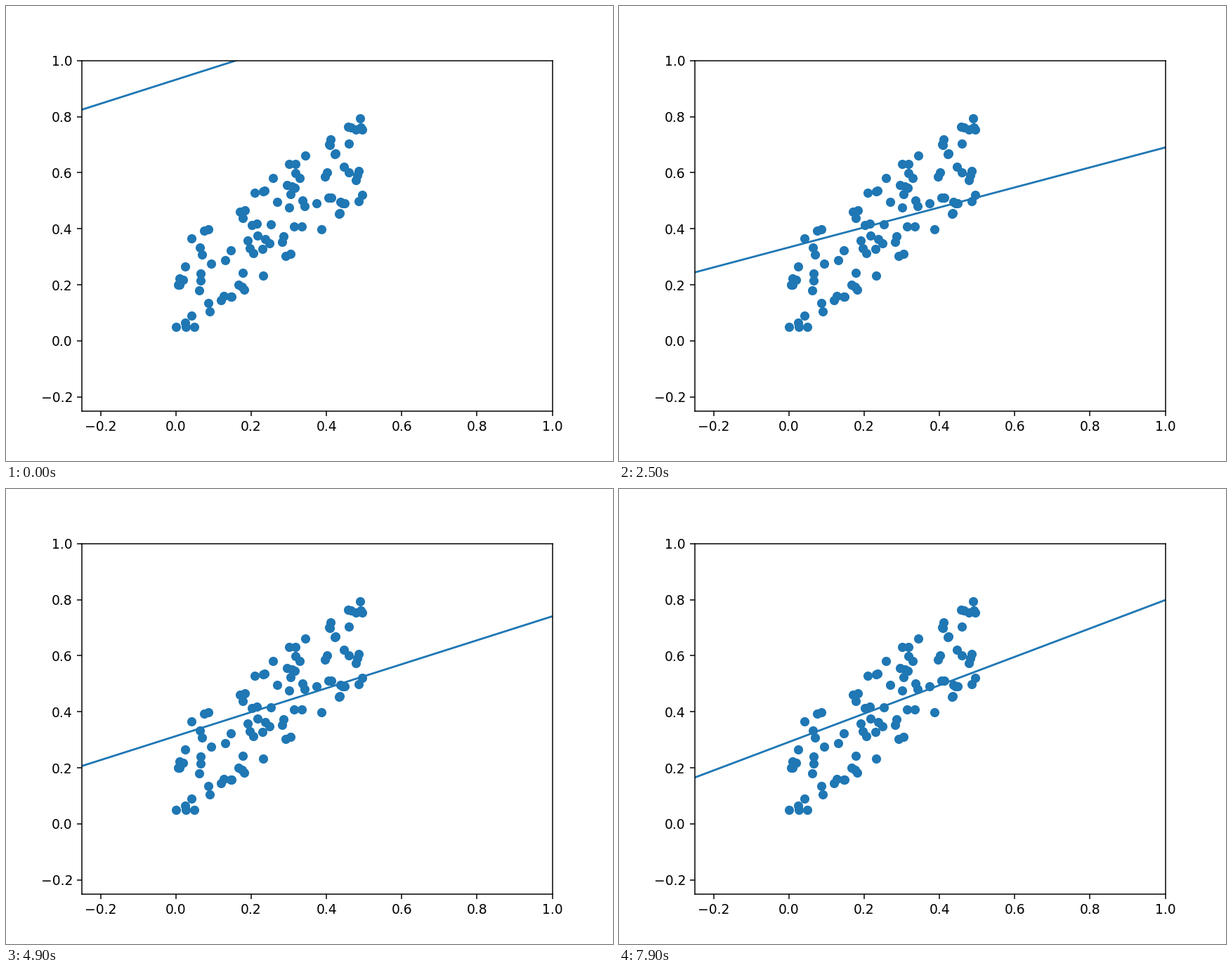
Recreate the animation shown at these times as a matplotlib script. Size 864 by 648 pixels, loop 8 s.

```python
import matplotlib.pyplot as plt
import numpy as np
from matplotlib.animation import FuncAnimation

FRAMES, INTERVAL = 80, 100

# Sample points, in thousandths
xs = np.array([
    490, 457, 465, 478, 491, 494, 411, 407, 409, 459, 344, 423, 422, 301,
    318, 318, 329, 258, 446, 459, 401, 396, 485, 482, 478, 295, 309, 315,
    304, 209, 231, 235, 269, 301, 337, 342, 373, 405, 413, 437, 443, 449,
    433, 435, 495, 485, 170, 183, 178, 202, 215, 253, 216, 237, 191, 248,
    197, 206, 229, 286, 282, 313, 334, 387, 291, 304, 232, 75, 86, 42,
    63, 70, 25, 94, 145, 130, 65, 65, 9, 18, 5, 9, 61, 86,
    90, 41, 0, 24, 26, 49, 120, 127, 146, 148, 166, 175, 181, 178]) / 1000
ys = np.array([
    793, 764, 762, 755, 762, 754, 719, 702, 699, 705, 660, 668, 666, 630,
    632, 599, 580, 582, 622, 600, 602, 586, 606, 591, 574, 555, 551, 546,
    524, 529, 534, 536, 496, 476, 502, 482, 490, 510, 512, 497, 491, 491,
    454, 457, 520, 499, 461, 466, 439, 414, 417, 416, 375, 364, 357, 349,
    331, 313, 327, 374, 352, 407, 407, 399, 302, 311, 234, 394, 397, 365,
    334, 308, 265, 275, 323, 289, 241, 215, 222, 219, 200, 200, 180, 136,
    106, 89, 51, 66, 50, 51, 146, 161, 158, 158, 200, 193, 183, 243]) / 1000

# Gradient descent on the squared error of slope and intercept
RATE = 0.2
HESSIAN = np.array([[0.0911, 0.2612], [0.2612, 1.0]])
BEST = np.array([1.084, 0.138])
START = np.array([0.428, 0.932])


def descend(steps):
    fit, path = START, []
    for _ in range(steps):
        path.append(fit)
        fit = fit - RATE * HESSIAN @ (fit - BEST)
    return path


path = descend(FRAMES)
span = np.array([-0.5, 1.5])

fig, ax = plt.subplots(figsize=(6.4, 4.8), dpi=135)
ax.scatter(xs, ys, color="C0")
line, = ax.plot([], [], color="C0")
ax.set(xlim=(-0.25, 1), ylim=(-0.25, 1))


def update(i):
    slope, intercept = path[i]
    line.set_data(span, slope * span + intercept)
    return line,


anim = FuncAnimation(fig, update, frames=FRAMES, interval=INTERVAL,
                     repeat=True, repeat_delay=0)
plt.show()
```
